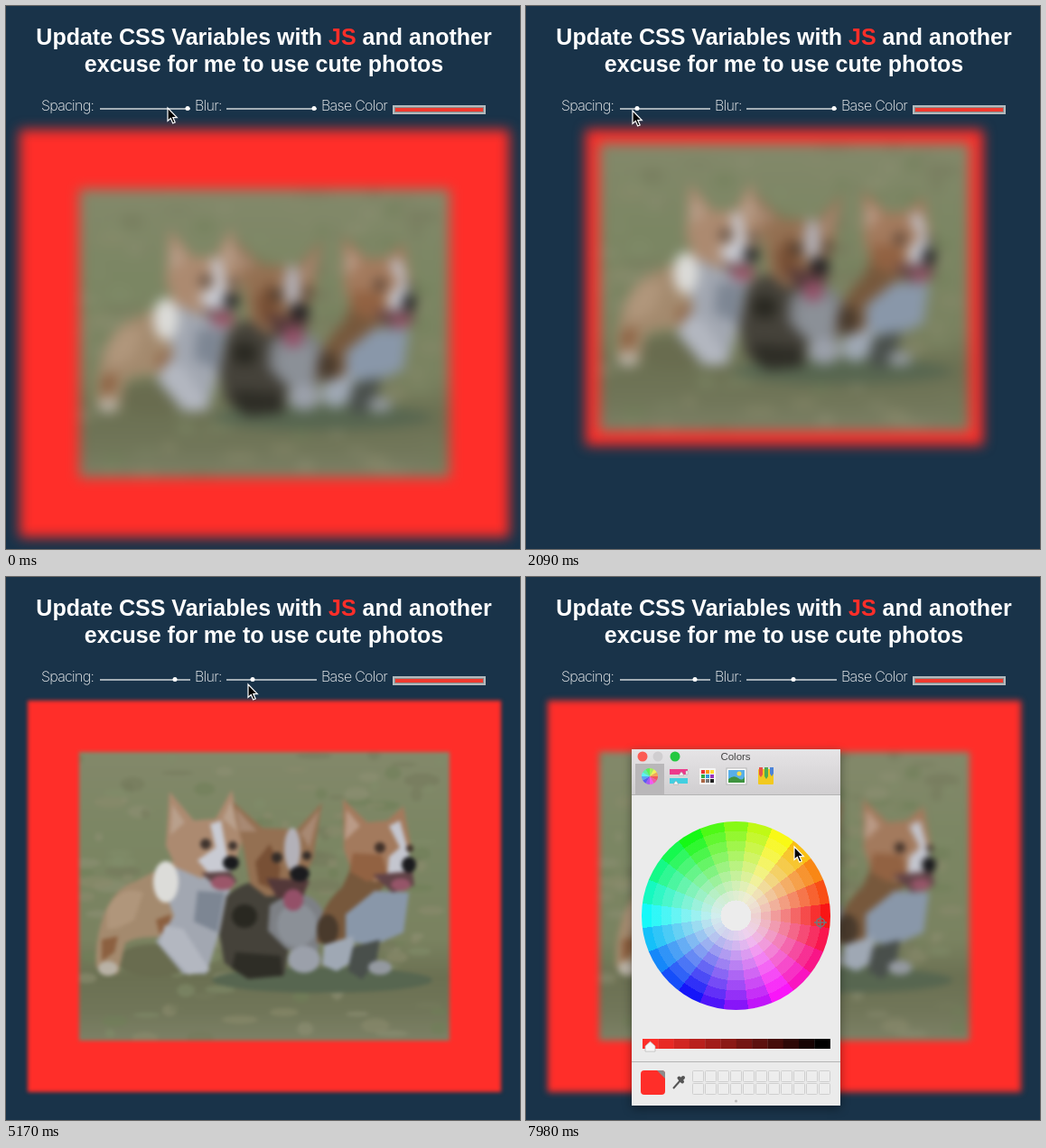
An HTML page that plays this animation: 569 px wide and 602 px high, repeating every 8 s.

```html
<!DOCTYPE html>
<html lang="en">
<head>
<meta charset="utf-8">
<title>CSS Variables</title>
<style>
  html, body { margin: 0; width: 100%; height: 100%; overflow: hidden; background: #193349; }
  body { position: relative; }
  #photo { position: absolute; top: 137px; background: var(--base); line-height: 0; }
  :root { --base: #ff2e29; }
  #photo svg { display: block; width: 410px; height: 320px; }
  #ui { position: absolute; left: 0; top: 0; }
  h2, .label { fill: #fff; }
  .title { font: bold 25px "Liberation Sans", Arial, sans-serif; text-anchor: middle; fill: #fff; }
  .label { font: 200 16px Inter, "Liberation Sans", sans-serif; letter-spacing: -.7px; }
  .track { fill: #a3aeb6; }
  .thumb { fill: #fff; }
  #panel { position: absolute; left: 117px; top: 191px; width: 231px; height: 395px;
    background: #ebebeb; box-shadow: 0 3px 10px rgba(0, 0, 0, .4); }
  #panel svg { position: absolute; left: 0; top: 0; }
  #wheel { position: absolute; left: 11px; top: 80px; width: 209px; height: 209px; border-radius: 50%; }
  .caption { font: 11.5px "Liberation Sans", Arial, sans-serif; text-anchor: middle; fill: #444; }
  .cell { fill: #ededed; stroke: #cfcfcf; }
</style>
</head>
<body>
<div id="photo">
  <svg viewBox="81 194 410 320" preserveAspectRatio="none">
    <defs>
      <linearGradient id="grass" x2="0" y2="1">
        <stop offset="0" stop-color="#83886a"/>
        <stop offset=".3" stop-color="#7b8663"/>
        <stop offset=".65" stop-color="#7a8260"/>
        <stop offset=".78" stop-color="#6b7052"/>
        <stop offset=".9" stop-color="#717659"/>
        <stop offset="1" stop-color="#7d8166"/>
      </linearGradient>
    </defs>
    <rect x="81" y="194" width="410" height="320" fill="url(#grass)"/>
    <g id="tufts"></g>
    <ellipse cx="350" cy="447" rx="122" ry="14" fill="#576650"/>
    <ellipse cx="165" cy="425" rx="42" ry="18" fill="#696c4f"/>

    <!-- left dog -->
    <path fill="#a48a6e" d="M100 432C98 402 108 348 142 338L188 314L204 392C176 404 150 394 132 406L124 440H106Z"/>
    <path fill="#b0967b" d="M112 368Q128 340 152 350L142 380Q122 392 112 390Z"/>
    <path fill="#8c6040" d="M106 402L124 398L120 416L106 426ZM166 380L182 374L184 392L170 396Z"/>
    <ellipse cx="113" cy="434" rx="11" ry="8" fill="#b9b2a6"/>
    <path fill="#a2a7b1" d="M166 322Q222 316 248 346L238 388L222 440H196L166 404L186 376Z"/>
    <path fill="#7d8693" d="M212 348L242 350L234 394L208 382Z"/>
    <ellipse cx="177" cy="338" rx="14" ry="23" fill="#dcdcd9"/>
    <path fill="#b3b7c0" d="M176 386L196 390L226 436L202 441L170 406Z"/>
    <path fill="#ac8a70" d="M177 298L181 238L208 270L232 268L250 236L262 290L252 322L216 334L188 322Z"/>
    <path fill="#b9a08c" d="M182 286L184 252L198 272ZM240 268L250 246L256 282Z"/>
    <path fill="#c9cbd3" d="M226 274L238 270L244 304L250 332L224 328L212 314L232 300Z"/>
    <path fill="#5d4546" d="M216 328L248 326L256 338L236 347Z"/>
    <ellipse cx="240" cy="339" rx="13" ry="8" fill="#9b5669"/>
    <circle cx="221" cy="296" r="6" fill="#40352f"/>
    <circle cx="251" cy="298" r="5" fill="#40352f"/>
    <ellipse cx="249" cy="317" rx="9" ry="8" fill="#191a1d"/>

    <!-- middle dog -->
    <path fill="#45423a" d="M244 354Q272 326 304 348L314 404L308 442L268 446L242 428L236 396Z"/>
    <ellipse cx="264" cy="376" rx="14" ry="13" fill="#292821"/>
    <path fill="#2e2d26" d="M254 416L304 420L306 442L268 445L250 434Z"/>
    <path fill="#7d8085" d="M292 364Q334 336 352 372L344 424L310 412L290 392Z"/>
    <ellipse cx="322" cy="386" rx="22" ry="24" fill="#8b9097"/>
    <ellipse cx="330" cy="424" rx="18" ry="15" fill="#9ba0aa"/>
    <path fill="#947052" d="M264 306L250 248L284 278L322 280L350 250L340 312L320 352L288 354L270 340Z"/>
    <path fill="#a88973" d="M259 282L254 256L278 282ZM326 284L347 258L336 300Z"/>
    <path fill="#785035" d="M276 316L292 296L304 322L300 348L280 340Z"/>
    <ellipse cx="317" cy="302" rx="9" ry="24" fill="#b3b1b8"/>
    <path fill="#533839" d="M288 334L336 336L328 356L300 356Z"/>
    <ellipse cx="318" cy="358" rx="11" ry="12" fill="#945068"/>
    <circle cx="300" cy="311" r="6" fill="#332c28"/>
    <circle cx="333" cy="309" r="5" fill="#332c28"/>
    <ellipse cx="325" cy="329" rx="11" ry="9" fill="#1b1b1e"/>

    <!-- right dog -->
    <path fill="#77583c" d="M344 406Q344 368 372 344L386 314L424 336L394 372L378 404Z"/>
    <ellipse cx="356" cy="391" rx="12" ry="17" fill="#493a2c"/>
    <path fill="#8997a9" d="M376 374L408 348L446 350L440 394L408 408L376 404Z"/>
    <path fill="#9fa8b4" d="M352 408L384 398L388 424L366 437L350 430Z"/>
    <path fill="#494f4b" d="M384 410L414 402L410 426L394 446L378 436Z"/>
    <ellipse cx="414" cy="433" rx="13" ry="8" fill="#9499a0"/>
    <path fill="#a37a5d" d="M374 302L373 246L400 272L422 270L440 254L448 296L440 330L408 338L382 324Z"/>
    <path fill="#ba9b87" d="M375 292L377 258L392 276Z"/>
    <path fill="#926242" d="M384 306L416 308L422 328L400 338L380 326Z"/>
    <path fill="#c4c6cf" d="M424 276L436 270L446 306L448 328L422 330L424 310L436 300Z"/>
    <path fill="#614347" d="M406 330L450 326L452 342L428 350Z"/>
    <ellipse cx="437" cy="341" rx="11" ry="7" fill="#965569"/>
    <circle cx="414" cy="300" r="6" fill="#413129"/>
    <circle cx="447" cy="301" r="4" fill="#413129"/>
    <ellipse cx="446" cy="319" rx="8" ry="9" fill="#1b1b1e"/>
  </svg>
</div>

<svg id="ui" width="569" height="602">
  <text class="title" x="285.5" y="43">Update CSS Variables with <tspan fill="#ff2e29">JS</tspan> and another</text>
  <text class="title" x="285.5" y="73">excuse for me to use cute photos</text>
  <text class="label" x="39" y="116">Spacing:</text>
  <rect class="track" x="104" y="113" width="100" height="2"/>
  <circle class="thumb" id="spacing" cy="113.5" r="2.5"/>
  <text class="label" x="209" y="116">Blur:</text>
  <rect class="track" x="244" y="113" width="100" height="2"/>
  <circle class="thumb" id="blur" cy="113.5" r="2.5"/>
  <text class="label" x="349" y="116">Base Color</text>
  <rect x="428" y="110" width="103" height="10" fill="#b3babd"/>
  <rect x="430" y="112" width="99" height="6" fill="#8b8b8b"/>
  <rect x="431" y="113" width="97" height="4" fill="#f03a2f"/>
</svg>

<div id="panel">
  <svg width="231" height="395">
    <defs>
      <linearGradient id="bar" x2="0" y2="1">
        <stop offset="0" stop-color="#e6e4e6"/>
        <stop offset="1" stop-color="#d0ced0"/>
      </linearGradient>
    </defs>
    <rect width="231" height="50" fill="url(#bar)"/>
    <rect x="4" y="16" width="32" height="34" fill="#b9b7b9"/>
    <path stroke="#b4b4b4" d="M0 50.5H231M0 346.5H231"/>
    <circle cx="12" cy="8" r="5.5" fill="#fc5b53"/>
    <circle cx="29" cy="8" r="5.5" fill="#d0ced0"/>
    <circle cx="48" cy="8" r="5.5" fill="#24c840"/>
    <text class="caption" x="115" y="12">Colors</text>
    <!-- toolbar -->
    <g id="pie"></g>
    <rect x="42" y="22" width="20" height="6" fill="#ed3b8c"/>
    <rect x="42" y="32" width="20" height="6" fill="#42cfe0"/>
    <path fill="#fff" stroke="#aaa" stroke-width=".6" d="M52 29L55 25L58 29ZM46 39L49 35L52 39ZM60 24H62V28H60Z"/>
    <rect x="75" y="21" width="18" height="18" rx="1" fill="#f5f5f5"/>
    <g id="chips"></g>
    <rect x="105" y="21" width="22" height="18" fill="#fff" stroke="#b5b5b5"/>
    <rect x="107" y="23" width="18" height="14" fill="#58aee8"/>
    <path fill="#3f9440" d="M107 33Q113 28 118 32T125 30V37H107Z"/>
    <circle cx="119" cy="27" r="2.5" fill="#f6dc4f"/>
    <rect x="140" y="22" width="17" height="17" rx="1" fill="#f2c91f"/>
    <path fill="#e65248" d="M141 20H145V28L143 31L141 28Z"/>
    <path fill="#4dac52" d="M147 20H151V30L149 33L147 30Z"/>
    <path fill="#4b83d8" d="M153 20H157V27L155 30L153 27Z"/>
    <!-- brightness and swatches -->
    <g id="ramp"></g>
    <path fill="#f7f7f7" stroke="#b5b5b5" stroke-width=".7" d="M20.500 324L26 329V335H15V329Z"/>
    <rect x="10" y="356" width="27" height="27" rx="4" fill="#ff2e29"/>
    <path fill="#8b8b8b" d="M28 356H33Q37 356 37 360V365Z"/>
    <path stroke="#555" stroke-width="2" fill="none" d="M46 376L54 367"/>
    <path stroke="#555" stroke-width="4" stroke-linecap="round" d="M54 367L57 364M52.500 364.500L56 368.500"/>
    <g id="cells"></g>
    <circle cx="115.500" cy="390" r="1.500" fill="#bbb"/>
  </svg>
  <div id="wheel"></div>
  <svg width="231" height="395">
    <circle cx="209" cy="192" r="4.500" fill="none" stroke="#71777b" stroke-width="1.500"/>
    <path stroke="#71777b" stroke-width="1.300" d="M202 192H216M209 185V199"/>
  </svg>
</div>

<svg id="cursor" width="20" height="26" style="position:absolute;left:0;top:0;overflow:visible">
  <path fill="#000" stroke="#fff" stroke-width="1.200" d="M0 0V14.500L3.300 11.500L5.700 17L8.200 16L5.800 10.600H10.300Z"/>
</svg>

<script>
const $ = id => document.getElementById(id);
const LOOP = 8000, TICK = 147.7;

const spacingKeys = [[3, 201], [4, 199], [8, 190], [10, 169], [14, 123], [16, 109], [17, 109], [22, 187]];
const blurKeys = [[29, 341], [30, 336], [35, 273], [38, 252], [39, 252], [44, 296]];
const cursorKeys = [
  [0, 179, 113], [2, 196, 114], [3, 196, 114], [8, 184, 115], [10, 164, 115], [14, 118, 116],
  [16, 104, 116], [17, 104, 116], [22, 182, 114], [25, 339, 102], [28, 340, 113], [29, 340, 113],
  [35, 268, 119], [38, 247, 121], [39, 247, 121], [44, 297, 124], [45, 297, 124],
  [49, 452, 116], [52, 452, 116], [54, 297, 299]
];

function sample(keys, tick) {
  const next = keys.findIndex(k => k[0] > tick);
  if (next === 0) return keys[0].slice(1);
  if (next < 0) return keys[keys.length - 1].slice(1);
  const a = keys[next - 1], b = keys[next];
  const f = (tick - a[0]) / (b[0] - a[0]);
  return a.slice(1).map((v, i) => v + (b[i + 1] - v) * f);
}

function add(parent, tag, attrs) {
  const el = document.createElementNS("http://www.w3.org/2000/svg", tag);
  for (const k in attrs) el.setAttribute(k, attrs[k]);
  $(parent).append(el);
}

let seed = 11;
const rand = () => (seed = seed * 16807 % 2147483647) / 2147483647;

function buildGrass() {
  const tones = ["#8d8f73", "#6f7f58", "#808c69", "#75795c", "#8a8a6c"];
  for (let i = 0; i < 170; i++) {
    add("tufts", "ellipse", {
      cx: 81 + rand() * 410, cy: 194 + rand() * 320,
      rx: 4 + rand() * 16, ry: 2 + rand() * 6,
      fill: tones[Math.floor(rand() * tones.length)], opacity: .6
    });
  }
}

function buildPanel() {
  const sectors = 24, step = 360 / sectors;
  const hues = Array.from({ length: sectors }, (_, i) =>
    `hsl(${360 - i * step} 95% 53%) ${i * step}deg ${(i + 1) * step}deg`);
  const rings = Array.from({ length: 9 }, (_, i) => {
    const from = i ? 17 + (i - 1) * 11 : 0;
    return `rgba(236,236,236,${Math.max(0, 1 - i / 8)}) ${from}px ${17 + i * 11}px`;
  });
  $("wheel").style.background =
    `radial-gradient(circle, ${rings}), conic-gradient(from ${90 - step / 2}deg, ${hues})`;

  for (let i = 0; i < 12; i++) {
    const a = i * Math.PI / 6, b = a + Math.PI / 6;
    const at = t => `${20 + 9 * Math.cos(t)} ${30 + 9 * Math.sin(t)}`;
    add("pie", "path", { d: `M20 30L${at(a)}A9 9 0 0 1 ${at(b)}Z`, fill: `hsl(${360 - i * 30} 85% 65%)` });
  }
  const chips = ["#e33", "#f90", "#fd3", "#3a4", "#39d", "#93b", "#a64", "#777", "#222"];
  chips.forEach((fill, i) => add("chips", "rect", {
    x: 77 + i % 3 * 5, y: 23 + Math.floor(i / 3) * 5, width: 4, height: 4, fill
  }));
  for (let i = 0; i < 12; i++) {
    const k = 1 - i / 11;
    add("ramp", "rect", {
      x: 12 + i * 17.3, y: 321, width: 17.6, height: 11,
      fill: `rgb(${255 * k}, ${46 * k}, ${41 * k})`
    });
  }
  for (let i = 0; i < 22; i++) {
    add("cells", "rect", {
      class: "cell", x: 67.5 + i % 11 * 14, y: 356.5 + Math.floor(i / 11) * 14,
      width: 12, height: 12, rx: 1
    });
  }
}

function draw(now) {
  const tick = Math.floor((now % LOOP + 2) / TICK);
  const [spacing] = sample(spacingKeys, tick);
  const [blur] = sample(blurKeys, tick);
  const [x, y] = sample(cursorKeys, tick);
  const pad = 15 + (spacing - 123) * .655;
  const photo = $("photo").style;
  photo.left = 81 - pad + "px";
  photo.padding = pad + "px";
  photo.filter = `blur(${(blur - 246) / 95 * 7}px)`;
  $("spacing").setAttribute("cx", spacing);
  $("blur").setAttribute("cx", blur);
  $("cursor").style.transform = `translate(${x}px, ${y}px)`;
  $("panel").style.display = tick >= 50 ? "block" : "none";
}

buildGrass();
buildPanel();
const start = performance.now();
function frame() {
  draw(performance.now() - start);
  requestAnimationFrame(frame);
}
frame();
</script>
</body>
</html>
```
